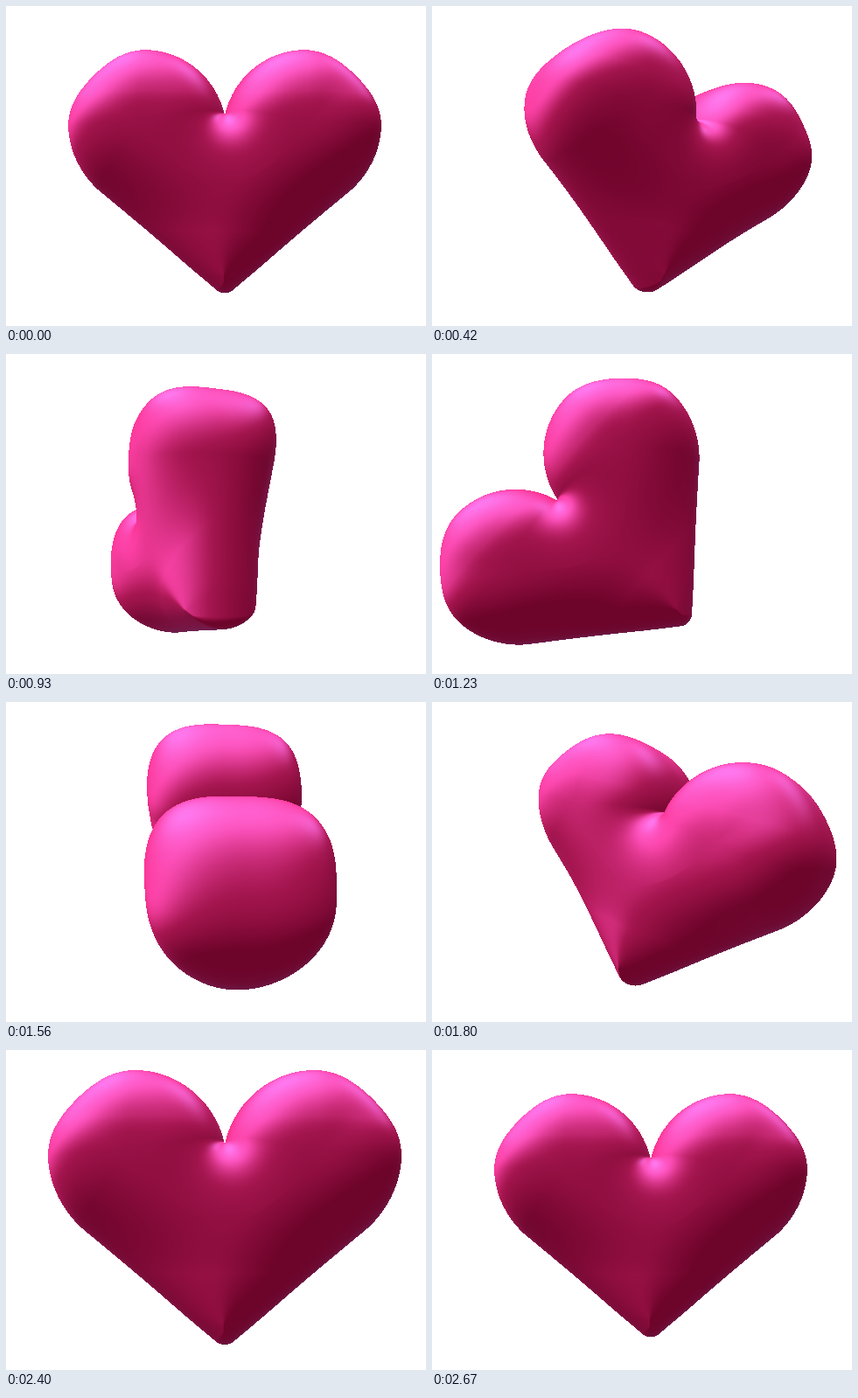
An HTML page with a canvas for the animation above (2.7 s loop, 480 by 366 pixels).

```html
<!DOCTYPE html>
<html lang="en">
<head>
<meta charset="utf-8">
<title>Spinning heart</title>
<style>
  html, body { margin: 0; width: 100%; height: 100%; overflow: hidden; background: #fff; }
  canvas { display: block; }
</style>
</head>
<body>
<canvas id="stage" width="480" height="366"></canvas>
<script>
const W = 480, H = 366, LOOP = 2700, STEP = 30;
const ctx = document.getElementById('stage').getContext('2d');
const { sin, cos, sqrt, abs, max, min, PI } = Math;
const clamp = v => max(0, min(1, v));
const mix = (a, b, v) => a + (b - a) * v;
const smooth = (a, b, t) => { const v = clamp((t - a) / (b - a)); return v * v * (3 - 2 * v); };

// Pose keys: time, yaw, roll, x shift
const KEYS = [
  [0, 0, 0, 0],
  [420, 29, 12.5, 5],
  [930, 110, 46, -16],
  [1230, 180, 47, -6],
  [1560, 276, 40, -4],
  [2060, 360, 0, 0],
  [2700, 360, 0, 0]
];

// Monotone cubic through column c of the keys
function track(c, t) {
  const rate = i => (KEYS[i + 1][c] - KEYS[i][c]) / (KEYS[i + 1][0] - KEYS[i][0]);
  const slope = i => {
    if (i === 0 || i === KEYS.length - 1) return 0;
    const a = rate(i - 1), b = rate(i);
    return a * b <= 0 ? 0 : 2 * a * b / (a + b);
  };
  let i = 0;
  while (i < KEYS.length - 2 && t >= KEYS[i + 1][0]) i++;
  const span = KEYS[i + 1][0] - KEYS[i][0], u = (t - KEYS[i][0]) / span;
  const v = u * u * (3 - 2 * u), w = 1 - u;
  return KEYS[i][c] * (1 - v) + KEYS[i + 1][c] * v
    + span * u * w * (slope(i) * w - slope(i + 1) * u);
}

const beat = t => 1 + 0.14 * (smooth(1780, 2345, t) - smooth(2345, 2670, t));

// Heart outline: lobe circle and tip circle joined by a tangent, mirrored in x
const LX = 88, LY = 118, LR = 90, TY = -54, TR = 15;
const CLEFT = sqrt(LR * LR - LX * LX);
const lean = Math.atan2(LX, LY - TY) + Math.asin((LR - TR) / Math.hypot(LX, LY - TY));
const UX = sin(lean), UY = cos(lean);
const BEVEL = 85, DEPTH = 87, THIN = 64;

function outline(x, y) {
  const k = max(0, 18 * (1 - ((y - 30) / 75) ** 2));
  const ax = sqrt(x * x + k * k), cx = ax - LX, cy = y - LY;
  if (UX * cx + UY * cy > 0 || cy * LX > -CLEFT * cx) {
    // The outer shoulder is slightly flattened
    const rr = cx * cx + cy * cy;
    const flat = cx > 0 && cy > 0 ? 2 * cx * cy / (rr + 1) : 0;
    return sqrt(rr) - LR + 5 * flat * flat;
  }
  const ty = y - TY, gy = cy - CLEFT;
  const side = UX * ax + UY * ty > 0 ? UY * ax - UX * ty : sqrt(ax * ax + ty * ty);
  return max(side - TR, -sqrt(ax * ax + gy * gy));
}

// Lower bound of the distance to the solid: boxy lobes, lens-like lower edges
function solid(x, y, z) {
  const box = smooth(5, 150, y);
  const q = max(0, 1 + outline(x, y) / BEVEL);
  const w = abs(z) / mix(THIN, DEPTH, box);
  return (Math.cbrt(q * q * mix(1, q, box) + w * w * mix(1, w, box)) - 1) * BEVEL * 0.9;
}

const DARK = [104, 2, 38], BASE = [168, 22, 80], LIGHT = [253, 68, 170];
const GLOW = [255, 125, 245], WARM = [250, 28, 115], COOL = [112, 55, 108];
const MID = 0.42, TOP = 0.76;

// Colour for a normal in view space, written to data at index i
function shade(data, i, nx, ny, nz) {
  const lit = clamp(-0.35 * nx + 0.3 * nx * nx + 0.7 * ny + 0.15 * ny * ny + 0.42 * nz);
  const spec = min(1, 0.95 * max(0, -0.32 * nx + 0.7 * ny + 0.64 * nz) ** 8
    + 0.55 * max(0, 0.5 * nx + 0.58 * ny + 0.64 * nz) ** 32);
  const rim = 0.85 * (1 - clamp(nz)) ** 3;
  const warm = clamp(0.6 + 0.64 * ny - 0.36 * nx);
  for (let c = 0; c < 3; c++) {
    let v = mix(DARK[c], BASE[c], smooth(-0.1, MID + 0.1, lit));
    v = mix(v, LIGHT[c], smooth(MID - 0.06, TOP, lit));
    v = mix(v, GLOW[c], spec);
    data[i + c] = mix(v, mix(COOL[c], WARM[c], warm), rim);
  }
}

const EYE = 700, NEAR = EYE - 270, FAR = EYE + 260, BLOCK = 8;

function render(t) {
  const img = ctx.createImageData(W, H), data = img.data.fill(255);
  const yaw = track(1, t) * PI / 180, roll = track(2, t) * PI / 180;
  const px = 250 + track(3, t), py = 261, zoom = 0.966 * beat(t);
  const cw = cos(yaw), sw = sin(yaw), cr = cos(roll), sr = sin(roll);

  const toModel = (x, y, z) => {
    const a = x * cw - z * sw;
    return [a * cr - y * sr, a * sr + y * cr, x * sw + z * cw];
  };
  const [ox, oy, oz] = toModel(0, 0, EYE);
  let dx, dy, dz;
  const aim = (x, y) => {
    const vx = (x - px) / zoom, vy = (py - y) / zoom;
    const l = sqrt(vx * vx + vy * vy + EYE * EYE);
    [dx, dy, dz] = toModel(vx / l, vy / l, -EYE / l);
  };
  // Walks the ray until it is within reach of the surface
  const march = (from, gap, reach) => {
    let s = from;
    for (let n = 0; n < 120 && s < FAR; n++) {
      const g = solid(ox + dx * s, oy + dy * s, oz + dz * s);
      if (g < reach) return s;
      s += g - gap;
    }
    return FAR;
  };

  for (let by = 0; by < H; by += BLOCK) for (let bx = 0; bx < W; bx += BLOCK) {
    aim(bx + BLOCK / 2, by + BLOCK / 2);
    const start = march(NEAR, 8, 10);
    if (start >= FAR) continue;
    for (let y = by; y < min(H, by + BLOCK); y++) for (let x = bx; x < bx + BLOCK; x++) {
      aim(x + 0.5, y + 0.5);
      const s = march(start - 4, 0, 0.2);
      if (s >= FAR) continue;
      const hx = ox + dx * s, hy = oy + dy * s, hz = oz + dz * s, e = 1.5;
      const g = solid(hx, hy, hz);
      const gx = solid(hx + e, hy, hz) - g, gy = solid(hx, hy + e, hz) - g;
      const gz = solid(hx, hy, hz + e) - g;
      const l = sqrt(gx * gx + gy * gy + gz * gz) || 1;
      const a = gx * cr + gy * sr;
      shade(data, (y * W + x) * 4,
        (a * cw + gz * sw) / l, (gy * cr - gx * sr) / l, (gz * cw - a * sw) / l);
    }
  }
  return img;
}

const cache = [];
let shown = -1;
function tick() {
  const n = Math.floor(performance.now() % LOOP / STEP);
  if (n !== shown) {
    cache[n] = cache[n] || render(n * STEP);
    ctx.putImageData(cache[n], 0, 0);
    shown = n;
  }
  requestAnimationFrame(tick);
}
tick();
</script>
</body>
</html>
```
